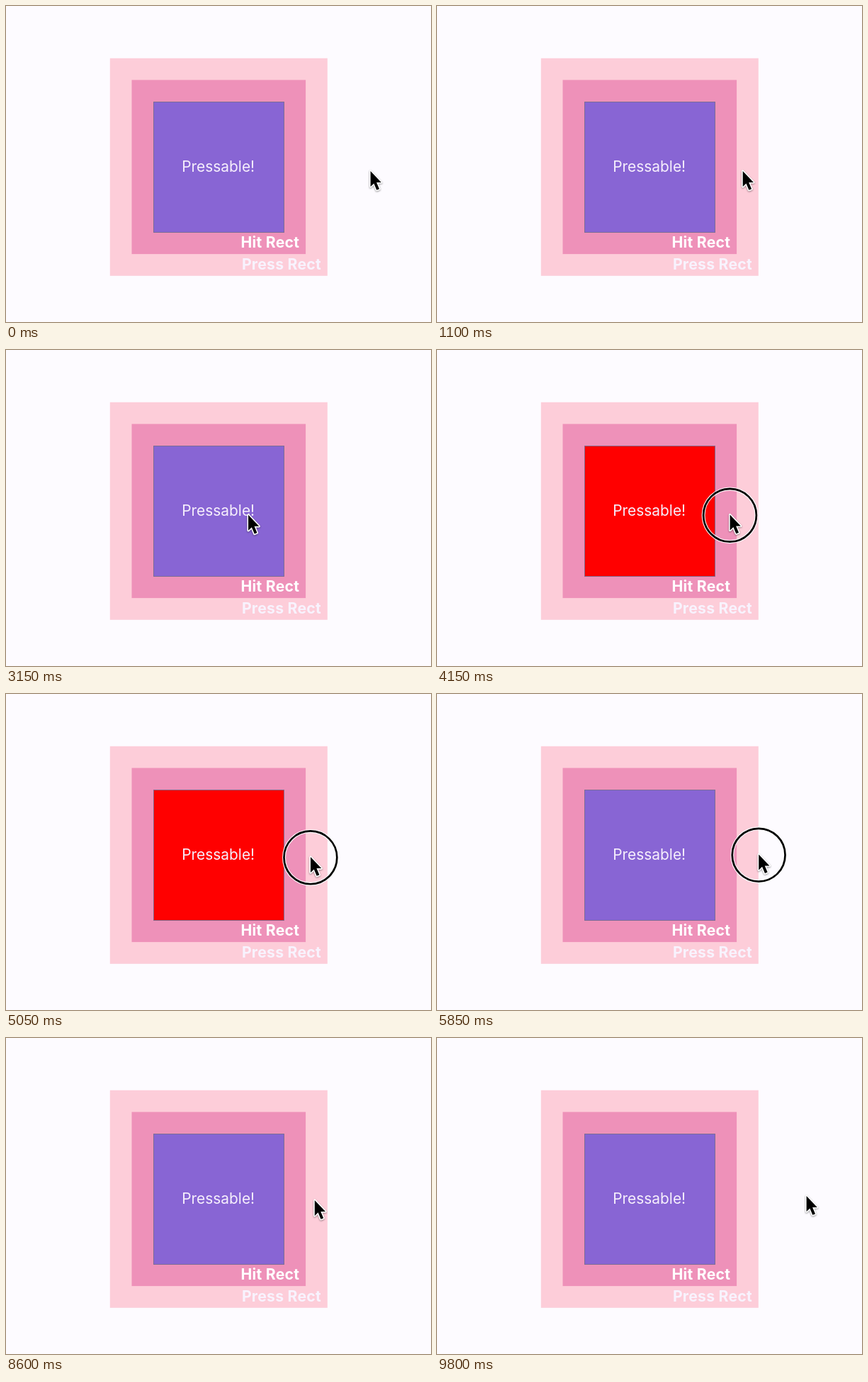
An HTML page for the animation above (9950 ms loop, 600x446 px).

```html
<!DOCTYPE html>
<html lang="en">
<head>
<meta charset="utf-8">
<title>Press and hit areas</title>
<style>
  html, body { margin: 0; width: 100%; height: 100%; overflow: hidden; background: #fdfbff; }
  svg { display: block; width: 600px; height: 446px; }
  text { font: 400 20.9px Inter, "Open Sans", sans-serif; fill: #f6effc; }
  .label { font-size: 21.2px; font-weight: 700; letter-spacing: .25px; text-anchor: end; }
  .arrow { stroke: #fff; stroke-width: 3.2; stroke-linejoin: round; paint-order: stroke;
           filter: drop-shadow(0 1.5px 1.3px rgba(0, 0, 0, .4)); }
</style>
</head>
<body>
<svg viewBox="0 0 600 446">
  <rect x="146.8" y="73.7" width="307" height="307.1" fill="#fdcdd9"/>
  <rect x="177.5" y="104.4" width="245.6" height="245.7" fill="#ee91b9"/>
  <rect id="box" x="208.5" y="135.5" width="184" height="184" stroke="#706b8e" stroke-opacity=".85"/>
  <text x="299.7" y="234.3" text-anchor="middle">Pressable!</text>
  <text class="label" x="414.3" y="341.3" style="fill:#fff">Hit Rect</text>
  <text class="label" x="445.1" y="371.8" style="fill:#f8f3fe">Press Rect</text>
  <g id="pointer">
    <g id="ring" fill="none">
      <circle cx=".5" cy="2.8" r="37.4" stroke="#fff" stroke-width="5" stroke-opacity=".9"/>
      <circle cx=".5" cy="2.8" r="37.4" stroke="#000" stroke-width="2.7"/>
    </g>
    <path class="arrow" d="M.6 2V24L5.4 19.4L9.3 28.7L13 27.2L9.1 18H15.8Z"/>
  </g>
</svg>
<script>
const LOOP = 9950, STEP = 50;

const smooth = u => u * u * (3 - 2 * u);
const glide = u => 1 - (1 - u) ** 1.2;

const home = { x: 514, y: 231 };
const moves = [
  { from: 550, to: 1800, x: 312, y: 231, ease: smooth },
  { from: 2900, to: 3900, x: 413, y: 230.5, ease: glide },
  { from: 4150, to: 6500, x: 463, y: 223, ease: smooth },
  { from: 6950, to: 7700, x: 434.5, y: 227, ease: smooth },
  { from: 8550, to: 9500, x: 521, y: 221, ease: smooth }
];
const held = [[2050, 2600], [4050, 6550], [7900, 8050]];
const active = [[2150, 2650], [4150, 5850]];

const [box, pointer, ring] = ['box', 'pointer', 'ring'].map(id => document.getElementById(id));
const during = (spans, t) => spans.some(([from, to]) => t >= from && t < to);

function position(t) {
  let { x, y } = home;
  for (const m of moves) {
    const k = m.ease(Math.min(1, Math.max(0, (t - m.from) / (m.to - m.from))));
    x += (m.x - x) * k;
    y += (m.y - y) * k;
  }
  return { x, y };
}

function draw(t) {
  const { x, y } = position(t);
  pointer.setAttribute('transform', `translate(${x} ${y})`);
  ring.setAttribute('visibility', during(held, t) ? 'visible' : 'hidden');
  box.setAttribute('fill', during(active, t) ? '#ff0000' : '#8865d4');
}

const start = performance.now();
function tick() {
  const t = (performance.now() - start + 1) % LOOP;
  draw(Math.floor(t / STEP) * STEP);
  requestAnimationFrame(tick);
}
tick();
</script>
</body>
</html>
```
